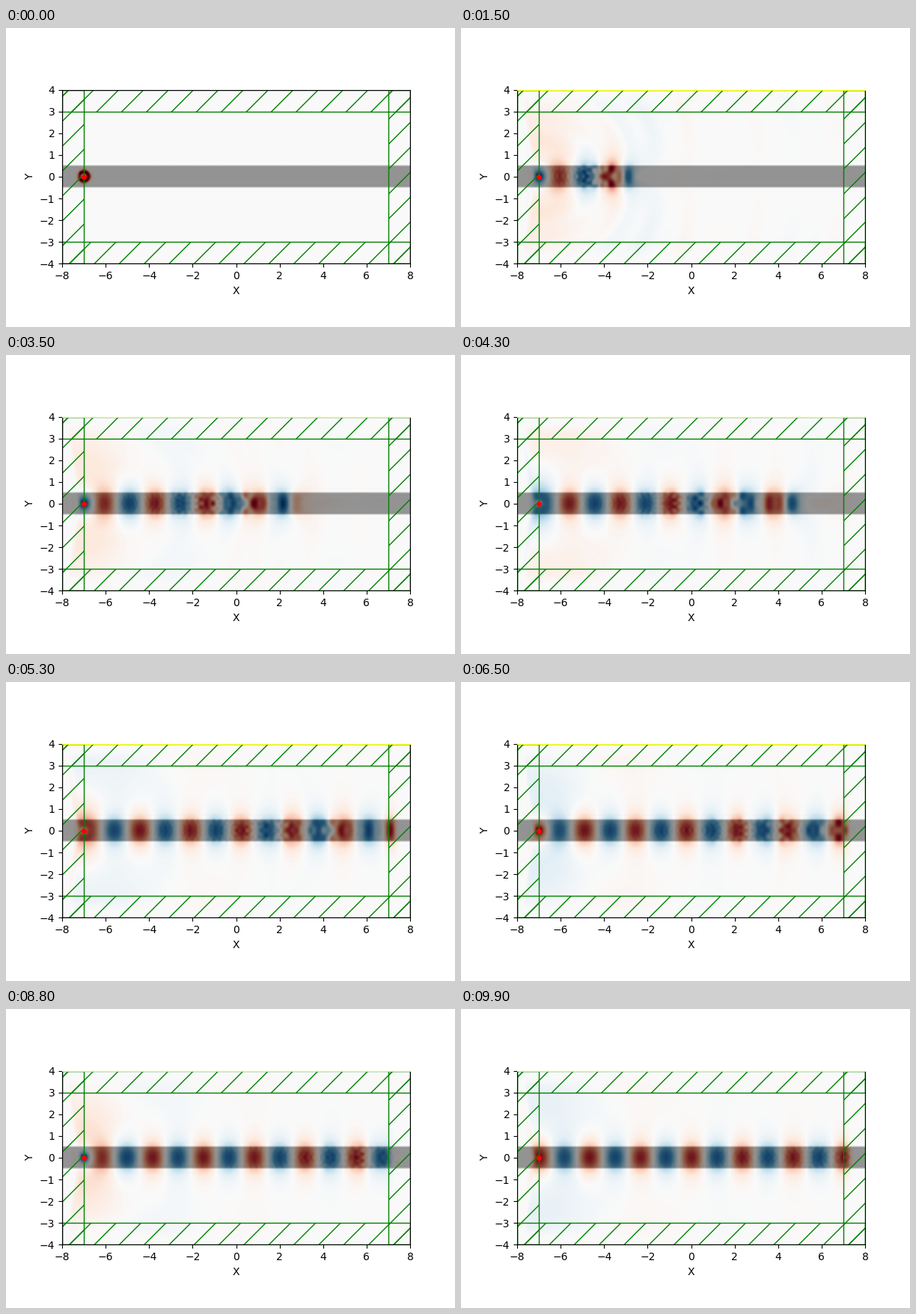
A matplotlib script for the animation above (10000 ms loop, 600 px wide and 400 px high).

```python
import numpy as np
import matplotlib.pyplot as plt
from matplotlib.animation import FuncAnimation
from matplotlib.patches import Rectangle

# Straight dielectric waveguide, 2D FDTD with absorbing layers.
W, H, RES, PML = 16, 8, 10, 1.0
EPS, FREQ, FRAMES = 12.0, 0.15, 100
DX, DT = 1 / RES, 0.5 / RES
EXTENT = (-W / 2, W / 2, -H / 2, H / 2)


def decay(pos, half):
    """Loss factors (a, b) of the update f = a*f + b*curl in the absorber."""
    depth = np.clip((np.abs(pos) - (half - PML)) / PML, 0, None)
    s = 0.5 * DT * 25.9 * depth ** 2
    return (1 - s) / (1 + s), DT / DX / (1 + s)


def simulate():
    nx, ny = W * RES, H * RES
    x = (np.arange(nx + 1) - nx // 2) * DX
    y = (np.arange(ny + 1) - ny // 2) * DX
    eps = np.where(np.abs(y) < 0.499, EPS, 1.0)
    eps[np.abs(np.abs(y) - 0.5) < 1e-6] = (EPS + 1) / 2

    ax_e, bx_e = (v[1:-1, None] for v in decay(x, W / 2))
    ay_e, by_e = (v[None, 1:-1] for v in decay(y, H / 2))
    ax_h, bx_h = (v[:, None] for v in decay(x[:-1] + DX / 2, W / 2))
    ay_h, by_h = (v[None, :] for v in decay(y[:-1] + DX / 2, H / 2))

    ez = np.zeros((nx + 1, ny + 1))
    dzx = np.zeros((nx - 1, ny - 1))
    dzy = np.zeros_like(dzx)
    hx = np.zeros((nx + 1, ny))
    hy = np.zeros((nx, ny + 1))
    src = (RES - 1, ny // 2 - 1)
    omega = 2 * np.pi * FREQ
    per_frame = round(1 / DT)

    shots = []
    for n in range(FRAMES * per_frame):
        hx = ay_h * hx - by_h * np.diff(ez, axis=1)
        hy = ax_h * hy + bx_h * np.diff(ez, axis=0)
        dzx = ax_e * dzx + bx_e * np.diff(hy, axis=0)[:, 1:-1]
        dzy = ay_e * dzy - by_e * np.diff(hx, axis=1)[1:-1, :]
        pulse = (np.sin(omega * (n + 1) * DT) - np.sin(omega * n * DT)) / omega
        dzx[src] -= pulse / 2
        dzy[src] -= pulse / 2
        ez[1:-1, 1:-1] = (dzx + dzy) / eps[1:-1]
        if (n + 1) % per_frame == 0:
            mid = (ez[:-1] + ez[1:]) / 2
            shots.append(((mid[:, :-1] + mid[:, 1:]) / 2).T)
    shots = np.array(shots)
    return shots / np.abs(shots).max()


fields = simulate()

fig, ax = plt.subplots(figsize=(6, 4), dpi=100)
fig.subplots_adjust(left=0.125, right=0.9, bottom=0.125, top=0.88)

rows = (np.arange(H * RES) + 0.5) * DX - H / 2
guide = np.tile(np.where(np.abs(rows) < 0.5, EPS, 1.0)[:, None], (1, W * RES))
look = dict(extent=EXTENT, origin="lower", interpolation="spline36")
ax.imshow(guide, cmap="binary", **look)
wave = ax.imshow(fields[0], cmap="RdBu", alpha=0.6, vmin=-0.8, vmax=0.8, **look)

for x0, y0, w, h in [(-8, -4, PML, H), (8 - PML, -4, PML, H),
                     (-8, 4 - PML, W, PML), (-8, -4, W, PML)]:
    ax.add_patch(Rectangle((x0, y0), w, h, edgecolor="g", facecolor="none",
                           hatch="/"))
ax.scatter([-7], [0], s=25, color="r", linewidths=0)

ax.set_xlim(-8, 8)
ax.set_ylim(-4, 4)
ax.set_xticks(range(-8, 9, 2))
ax.set_yticks(range(-4, 5))
ax.set_xlabel("X")
ax.set_ylabel("Y")


def update(k):
    wave.set_data(fields[k])
    ax.spines["top"].set_color("yellow" if k else "black")
    return [wave]


anim = FuncAnimation(fig, update, frames=FRAMES, interval=100,
                     init_func=lambda: update(0), repeat=True, repeat_delay=0)
plt.show()
```
